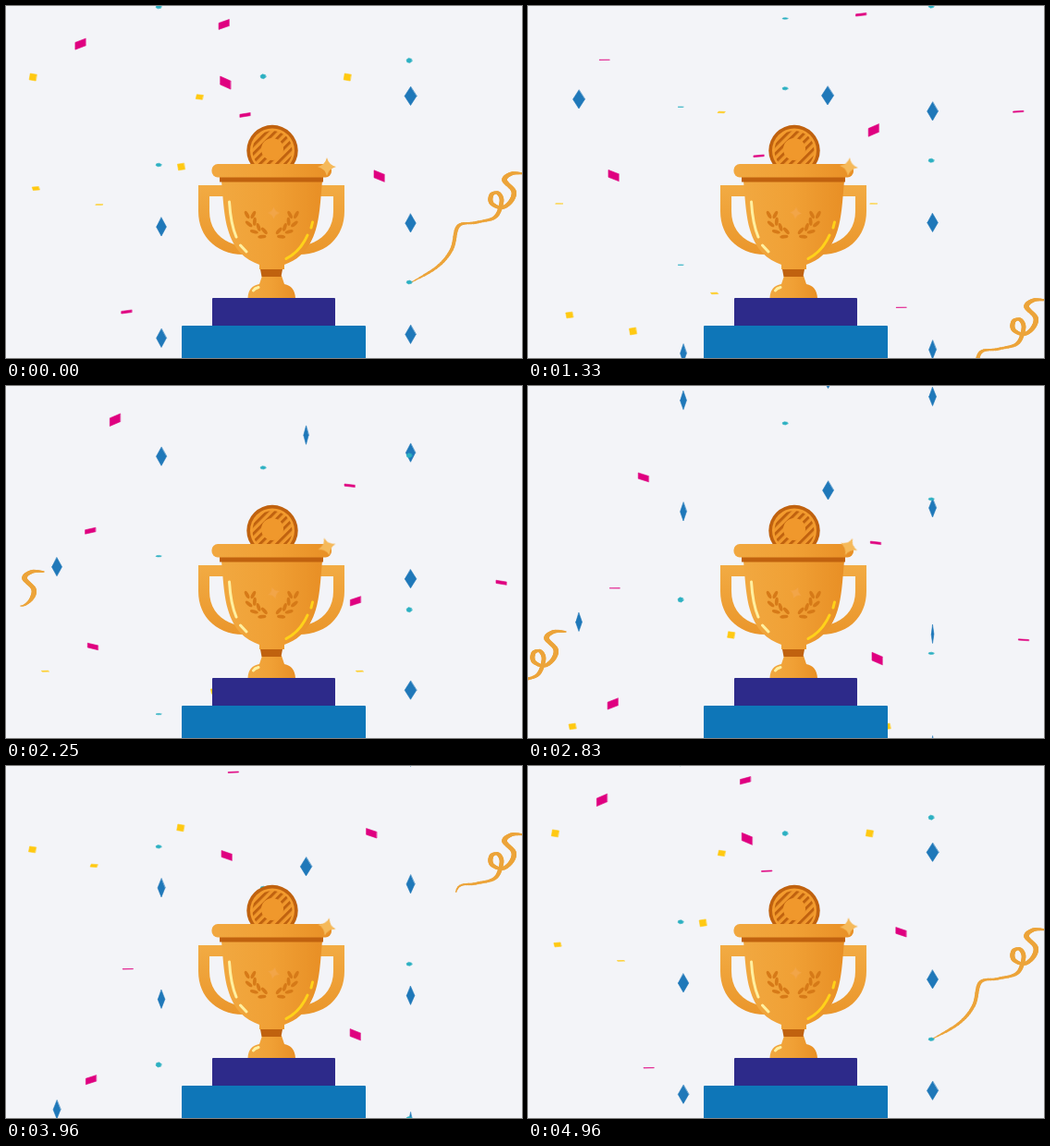
Write an HTML page with a canvas that moves like this. It is 558x381 px and loops after 5000 ms.

```html
<!DOCTYPE html>
<html lang="en">
<head>
<meta charset="utf-8">
<title>Trophy with confetti</title>
<style>
  html, body { margin: 0; width: 100%; height: 100%; overflow: hidden; background: #f3f4f8; }
  canvas, svg { position: absolute; left: 0; top: 0; width: 558px; height: 381px; }
  .star { animation: turn 5s linear infinite; }
  @keyframes turn { to { transform: rotate(360deg); } }
</style>
</head>
<body>
<canvas id="stage" width="558" height="381"></canvas>
<svg viewBox="0 0 558 381">
  <defs>
    <linearGradient id="gold">
      <stop offset="0" stop-color="#f1a840"/>
      <stop offset=".5" stop-color="#f0a035"/>
      <stop offset="1" stop-color="#e88f25"/>
    </linearGradient>
    <linearGradient id="arm" x2="0" y2="1">
      <stop offset="0" stop-color="#f2ab43"/>
      <stop offset="1" stop-color="#ea962b"/>
    </linearGradient>
    <pattern id="stripes" width="6.4" height="6.4" patternUnits="userSpaceOnUse" patternTransform="rotate(45)">
      <rect width="6.4" height="6.4" fill="#f0982c"/>
      <rect width="3" height="6.4" fill="#c0620f"/>
    </pattern>
    <path id="sparkle" d="M0-10Q2-2 10 0 2 2 0 10-2 2-10 0-2-2 0-10Z"/>
    <path id="handle" d="M235 194H208V222C208 251 229 269 257 269L250 259C232 254 220 242 220 222V206H235Z"/>
    <g id="laurel"></g>
  </defs>

  <circle cx="288" cy="156.500" r="27.700" fill="#c0620f"/>
  <circle cx="288" cy="156.500" r="24" fill="#f39c2e"/>
  <circle cx="288" cy="156.500" r="21.500" fill="url(#stripes)"/>
  <circle cx="288" cy="155" r="12" fill="#f0982c"/>

  <g fill="url(#arm)">
    <use href="#handle"/>
    <use href="#handle" transform="matrix(-1 0 0 1 574 0)"/>
  </g>
  <path d="M233 189H342C340 213 339 229 335 242C329 262 318 274 301 280V285H274V280C256 274 246 262 240 242C236 229 235 213 233 189Z" fill="url(#gold)"/>
  <path d="M277 292H298L301 301Q312 303 313 316H261.500Q262 303 274 301Z" fill="url(#gold)"/>
  <path d="M275 285H299L297.500 293H276.500Z" fill="#c0620f"/>
  <rect x="231" y="184" width="112" height="6.500" fill="#c0620f"/>
  <rect x="222.500" y="171" width="129.500" height="14.500" rx="6.500" fill="url(#gold)"/>

  <g fill="#d67a18">
    <use href="#laurel"/>
    <use href="#laurel" transform="matrix(-1 0 0 1 574.500 0)"/>
  </g>
  <g fill="none" stroke-width="3" stroke-linecap="round">
    <path d="M241.500 212Q243 236 249 250M253.500 259L260 266M267.500 308Q269 305.500 273 304.500" stroke="#fff0a0"/>
    <path d="M331.500 234L330 240M326 248Q318 266 303 273.500" stroke="#ffd21a"/>
  </g>
  <g transform="translate(289.500 224) scale(.65)" fill="#f2a548"><use class="star" href="#sparkle"/></g>
  <g transform="translate(347 174)" fill="#f5b95a"><use class="star" href="#sparkle"/></g>

  <rect x="223" y="316" width="133" height="31" rx="1" fill="#2d2a8a"/>
  <rect x="190" y="346" width="199" height="37" rx="1" fill="#0e76b8"/>
</svg>
<script>
const H = 381, LOOP = 5, GAP = 1.17;
const canvas = document.getElementById('stage');
const ctx = canvas.getContext('2d');
const mod = (a, n) => ((a % n) + n) % n;
const clamp = v => Math.min(1, Math.max(0, v));

// Pairs of leaves along a quarter circle
const laurel = document.getElementById('laurel');
for (let i = 0; i < 8; i++) {
  const side = i % 2 ? 1 : -1, bend = (i >> 1) * 23;
  const a = (180 - bend) * Math.PI / 180, r = 22 + side * 3.4;
  const leaf = document.createElementNS('http://www.w3.org/2000/svg', 'ellipse');
  leaf.setAttribute('rx', 1.9);
  leaf.setAttribute('ry', 4.6);
  leaf.setAttribute('transform',
    `translate(${286 + r * Math.cos(a)} ${226 + r * Math.sin(a)}) rotate(${-bend - side * 28})`);
  laurel.append(leaf);
}

function polygon(corners, rx, ry, tilt = 0, skew = 0) {
  return Array.from({ length: corners }, (_, i) => {
    const a = tilt + i * 2 * Math.PI / corners, x = rx * Math.cos(a);
    return [x, ry * Math.sin(a) - skew * x];
  });
}

// A bit falls steadily and is edge-on at `edge`, then once every `flip` pixels.
// Emitters: x, y at time 0, and how many bits follow each other GAP seconds apart.
const kinds = [
  { color: '#1f78b9', speed: 103, flip: 120, edge: 37, sideways: true,
    shape: polygon(4, 6.5, 10),
    emitters: [[437.5, -23, 2], [437.5, 235, 2], [324.5, 216, 2], [168, 239, 2], [324, -40], [55, -36]] },
  { color: '#2cb0c2', speed: 81.4, flip: 85, edge: 22,
    shape: polygon(6, 3.1, 2.7, .3),
    emitters: [[278, -19, 2], [278, -190, 2], [165, 1], [165, 172], [436, 59], [436, 299]] },
  { color: '#ffc912', speed: 103, flip: 92, edge: 29,
    shape: polygon(4, 4.9, 4.9, .95),
    drift: y => .1 * (Math.hypot(y - 115, 60) - 60),
    emitters: [[28, 77, 2], [209, -22, 2], [368, 77], [187, 174], [95, 215]] },
  { color: '#df0080', speed: 107, flip: 53.5, edge: 5,
    shape: polygon(4, 7.8, 6.4, Math.PI / 4, .45),
    drift: y => -(((y - 255) / 58) ** 2),
    emitters: [[246, 83, 2], [378, -133, 2], [94, -84, 2], [252, 20], [264, 118], [405, 184], [132, 331], [536, -28]] }
];

function drawBit(kind, x, start, t) {
  const travel = kind.speed * LOOP, above = travel - H - 14;
  const y = mod(start + kind.speed * t + above, travel) - above;
  const face = Math.sin(Math.PI * (y - kind.edge) / kind.flip);
  const [sx, sy] = kind.sideways ? [face, 1] : [1, face];
  const cx = x + (kind.drift ? kind.drift(y) : 0);
  ctx.beginPath();
  for (const [px, py] of kind.shape) ctx.lineTo(cx + px * sx, y + py * sy);
  ctx.closePath();
  ctx.fill();
  ctx.stroke();
}

function drawKind(kind, t) {
  ctx.fillStyle = ctx.strokeStyle = kind.color;
  for (const [x, y, count = 1] of kind.emitters) {
    for (let i = 0; i < count; i++) drawBit(kind, x, y + i * kind.speed * GAP, t);
  }
}

// Ribbon from its curled head to the loose tail
const knots = [[560, 182], [547, 182], [539, 189], [549, 201], [546, 212], [536, 219], [525, 214], [525, 205],
  [532, 203], [536, 212], [529, 229], [508, 235], [489, 239], [482, 264], [465, 284], [432, 303]];

function spline(a, b, c, d, u) {
  return b + .5 * u * (c - a + u * (2 * a - 5 * b + 4 * c - d + u * (3 * (b - c) + d - a)));
}

const knot = i => knots[Math.min(knots.length - 1, Math.max(0, i))];
const ribbon = [];
let total = 0;
for (let s = 0; s < knots.length - 1; s += .125) {
  const i = Math.floor(s);
  const [x, y] = [0, 1].map(k => spline(knot(i - 1)[k], knot(i)[k], knot(i + 1)[k], knot(i + 2)[k], s - i));
  const last = ribbon.at(-1);
  const step = last ? Math.hypot(x - last.x, y - last.y) : 0;
  total += step;
  ribbon.push({ x, y, at: total, steep: step ? Math.abs(y - last.y) / step : 0 });
}

// Unrolls from the head while it falls
function drawRibbon(dx, dy, speed, start, t) {
  const age = mod(t - start, LOOP);
  const shown = total * clamp(.72 * (age - .13));
  ctx.strokeStyle = '#eca43a';
  ctx.lineCap = 'round';
  for (let i = 1; i < ribbon.length && ribbon[i].at < shown; i++) {
    const a = ribbon[i - 1], b = ribbon[i];
    const taper = clamp(.3 + (shown - b.at) / 28) * clamp(.4 + b.at / 16);
    ctx.lineWidth = Math.max(1, (3.2 + 2.6 * b.steep) * (1 - .45 * b.at / total) * taper);
    ctx.beginPath();
    ctx.moveTo(a.x + dx, a.y + dy + speed * age);
    ctx.lineTo(b.x + dx, b.y + dy + speed * age);
    ctx.stroke();
  }
}

let begin;
function frame(now) {
  begin ??= now;
  const t = ((now - begin) / 1000) % LOOP;
  ctx.clearRect(0, 0, canvas.width, canvas.height);
  drawRibbon(0, -219, 103, 2.88, t);
  drawRibbon(-519, -37, 112, 1.75, t);
  ctx.lineWidth = .6;
  for (const kind of kinds) drawKind(kind, t);
  requestAnimationFrame(frame);
}
requestAnimationFrame(frame);
</script>
</body>
</html>
```
